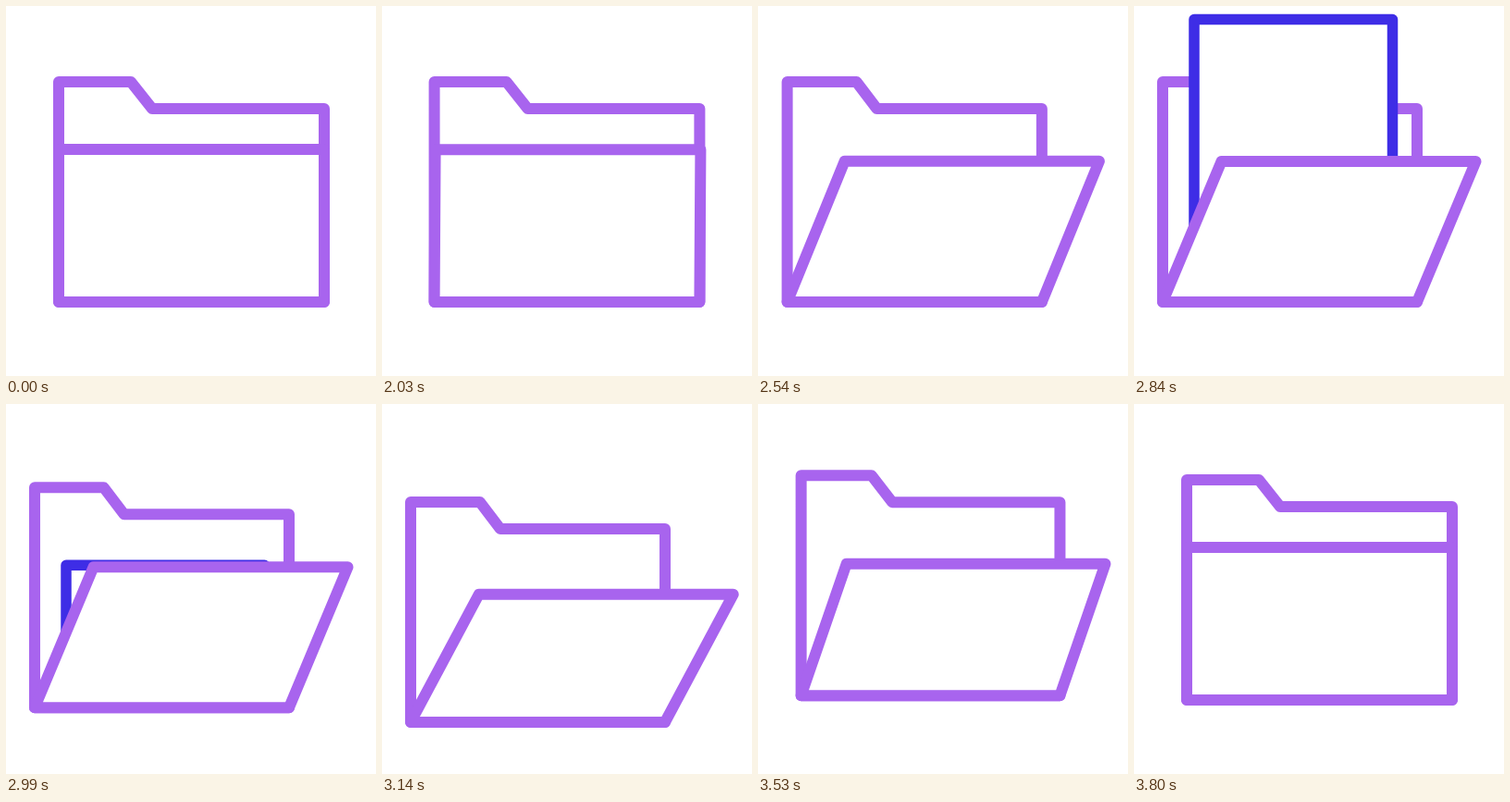
These frames come from a looping animation (400x400 px, 3.83 s). An HTML page:

```html
<!DOCTYPE html>
<html lang="en">
<head>
<meta charset="utf-8">
<title>Folder</title>
<style>
  html, body { margin: 0; width: 100%; height: 100%; overflow: hidden; background: #fff; }
  svg { display: block; width: 100%; height: 100%; }
  path { fill: #fff; stroke: #a864ee; stroke-width: 12; stroke-linejoin: round; }
  #paper { stroke: #3e2de6; stroke-width: 11.5; }
</style>
</head>
<body>
<svg viewBox="0 0 400 400">
  <clipPath id="above"><rect id="limit" width="400" height="320"/></clipPath>
  <path id="back"/>
  <g clip-path="url(#above)"><path id="paper"/></g>
  <path id="front"/>
</svg>
<script>
const LOOP = 3830, REST = 2030, STEP = 30;
const el = id => document.getElementById(id);
const back = el('back'), paper = el('paper'), front = el('front'), limit = el('limit');

// Sine-eased 0 to 1 between two times.
function ramp(t, from, to) {
  const p = Math.min(1, Math.max(0, (t - from) / (to - from)));
  return (1 - Math.cos(Math.PI * p)) / 2;
}

const outline = points => 'M' + points.map(p => p.join()).join('L') + 'Z';

function draw(t) {
  const open = ramp(t, 1980, 2600);    // lid tips forward
  const press = ramp(t, 2985, 3275);   // paper's weight pushes it further
  const slide = ramp(t, 3180, 3800);   // folder returns to the centre
  const shut = ramp(t, 3320, 3800);    // lid closes
  const drop = 24 * ramp(t, 2900, 3125) - 29 * ramp(t, 3125, 3495) + 5 * ramp(t, 3495, 3800);

  const left = 57 - 26 * (open - slide);
  const width = 287 - 12 * (open - shut);
  const lean = (63.5 * open + 18.5 * press) * (1 - shut);
  const height = 165 - (13 * open + 25 * press) * (1 - shut);

  const right = left + width, scale = width / 287;
  const top = 82 + drop, shoulder = top + 29, bottom = 320 + drop, lid = bottom - height;

  back.setAttribute('d', outline([
    [left, top], [left + 78 * scale, top], [left + 101 * scale, shoulder],
    [right, shoulder], [right, bottom], [left, bottom]
  ]));
  front.setAttribute('d', outline([
    [left + lean, lid], [right + lean, lid], [right, bottom], [left, bottom]
  ]));

  // The sheet falls at a steady speed and vanishes inside the folder.
  const sheet = -305 + 1.065 * (t - 2540);
  paper.setAttribute('d', `M65 ${sheet}h214.5v280h-214.5Z`);
  paper.style.display = t > 2540 && t < 3100 ? '' : 'none';
  limit.setAttribute('height', bottom);
}

const start = performance.now();
function tick() {
  const t = (performance.now() - start) % LOOP;
  draw(t < REST ? 0 : t - (t - REST) % STEP);
  requestAnimationFrame(tick);
}
tick();
</script>
</body>
</html>
```
